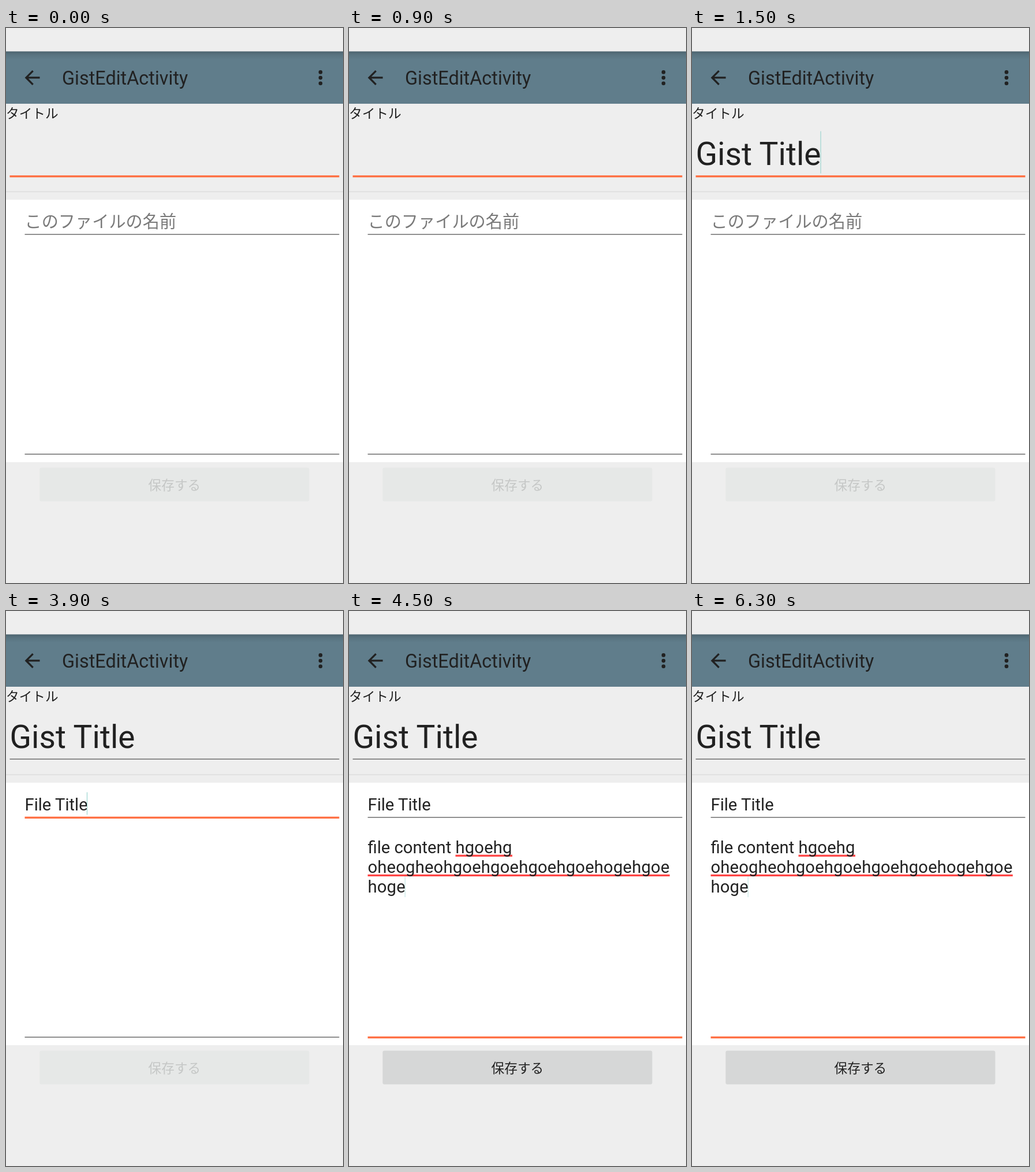
Animation, 584 px wide and 960 px high, one loop 7500 ms. Source, as an HTML page:

```html
<!DOCTYPE html>
<html lang="ja">
<head>
<meta charset="utf-8">
<title>Edit form</title>
<style>
html, body { margin: 0; width: 100%; height: 100%; overflow: hidden; background: #eee; }
svg { display: block; width: 100%; height: 100%; }
text { font-family: Roboto, "Noto Sans CJK JP", "Noto Sans CJK", sans-serif; fill: #212121; white-space: pre; }
.title { font-size: 32.44px; }
.label { font-size: 22.7px; }
.display { font-size: 55.15px; }
.body { font-size: 29.2px; }
.typed { letter-spacing: .19px; }
.hint { fill: #7a7a7a; }
.caret { fill: #80cbc4; }
.typo { fill: #ff4444; }
</style>
</head>
<body>
<svg viewBox="0 0 584 960">
  <defs>
    <linearGradient id="shade" x1="0" y1="0" x2="0" y2="1">
      <stop offset="0" stop-color="#000" stop-opacity=".2"/>
      <stop offset=".4" stop-color="#000" stop-opacity=".08"/>
      <stop offset="1" stop-color="#000" stop-opacity="0"/>
    </linearGradient>
  </defs>
  <rect width="584" height="960" fill="#eee"/>

  <rect y="40.5" width="584" height="90.5" fill="#607d8b"/>
  <rect y="40.5" width="584" height="14" fill="url(#shade)"/>
  <path transform="translate(26.1 66.5) scale(1.622)" fill="#212121"
    d="M20 11H7.83l5.59-5.59L12 4l-8 8 8 8 1.41-1.41L7.83 13H20z"/>
  <text class="title" x="97" y="98">GistEditActivity</text>
  <g fill="#212121">
    <circle cx="545" cy="76.4" r="3.3"/>
    <circle cx="545" cy="86.1" r="3.3"/>
    <circle cx="545" cy="95.8" r="3.3"/>
  </g>

  <text class="label" x="0" y="156">タイトル</text>
  <rect y="282.5" width="584" height="1.6" fill="#dedede"/>
  <rect y="297" width="584" height="454" fill="#fff"/>

  <g id="gistText">
    <text class="display" x="6.5" y="236.8">Gist Title</text>
  </g>
  <text id="hint" class="body hint" x="32.5" y="345">このファイルの名前</text>
  <g id="fileText">
    <text class="body" x="32.5" y="344.5">File Title</text>
  </g>
  <g id="contentText">
    <text class="body" x="32.5" y="418.5">file content</text>
    <rect class="typo" x="184.5" y="421.6" width="98.5" height="3.3"/>
    <rect class="typo" x="32.5" y="455.7" width="523.3" height="3.3"/>
    <text class="body typed" x="184.5" y="418.5">hgoehg</text>
    <text class="body typed" x="32.5" y="452.6">oheogheohgoehgoehgoehgoehogehgoe</text>
    <text class="body typed" x="32.5" y="486.7">hoge</text>
  </g>

  <rect id="gistLine" x="6.5" width="571"/>
  <rect id="fileLine" x="32.5" width="545"/>
  <rect id="contentLine" x="32.5" width="545"/>

  <rect id="gistCaret" class="caret" x="222.6" y="178.5" width=".9" height="73"/>
  <rect id="fileCaret" class="caret" x="140" y="313.5" width=".9" height="39"/>
  <rect id="contentCaret" class="caret" x="96.7" y="459" width=".8" height="36" opacity=".7"/>

  <rect id="button" x="58.3" y="760.5" width="467.2" height="58.3" rx="3"/>
  <text id="save" class="label" x="291.9" y="798.5" text-anchor="middle">保存する</text>
</svg>
<script>
const STEP = 1500, LOOP = 7500;
const $ = id => document.getElementById(id);

function show(id, on) {
  $(id).style.display = on ? "" : "none";
}

function setLine(id, y, active) {
  const line = $(id);
  line.setAttribute("y", active ? y - 0.5 : y);
  line.setAttribute("height", active ? 3.4 : 1.6);
  line.setAttribute("fill", active ? "#ff7043" : "#757575");
}

function render(time) {
  const step = Math.min(3, Math.floor((time % LOOP) / STEP));
  const filled = step === 3;

  show("gistText", step >= 1);
  show("hint", step < 2);
  show("fileText", step >= 2);
  show("contentText", filled);

  show("gistCaret", step === 1);
  show("fileCaret", step === 2);
  show("contentCaret", filled);

  setLine("gistLine", 255.4, step < 2);
  setLine("fileLine", 356.2, step === 2);
  setLine("contentLine", 736.4, filled);

  $("button").setAttribute("fill", filled ? "#d6d7d7" : "#e6e8e7");
  $("save").style.fill = filled ? "#212121" : "#c5c7c6";
}

const start = performance.now();
function tick() {
  render(performance.now() - start);
  requestAnimationFrame(tick);
}
tick();
</script>
</body>
</html>
```
